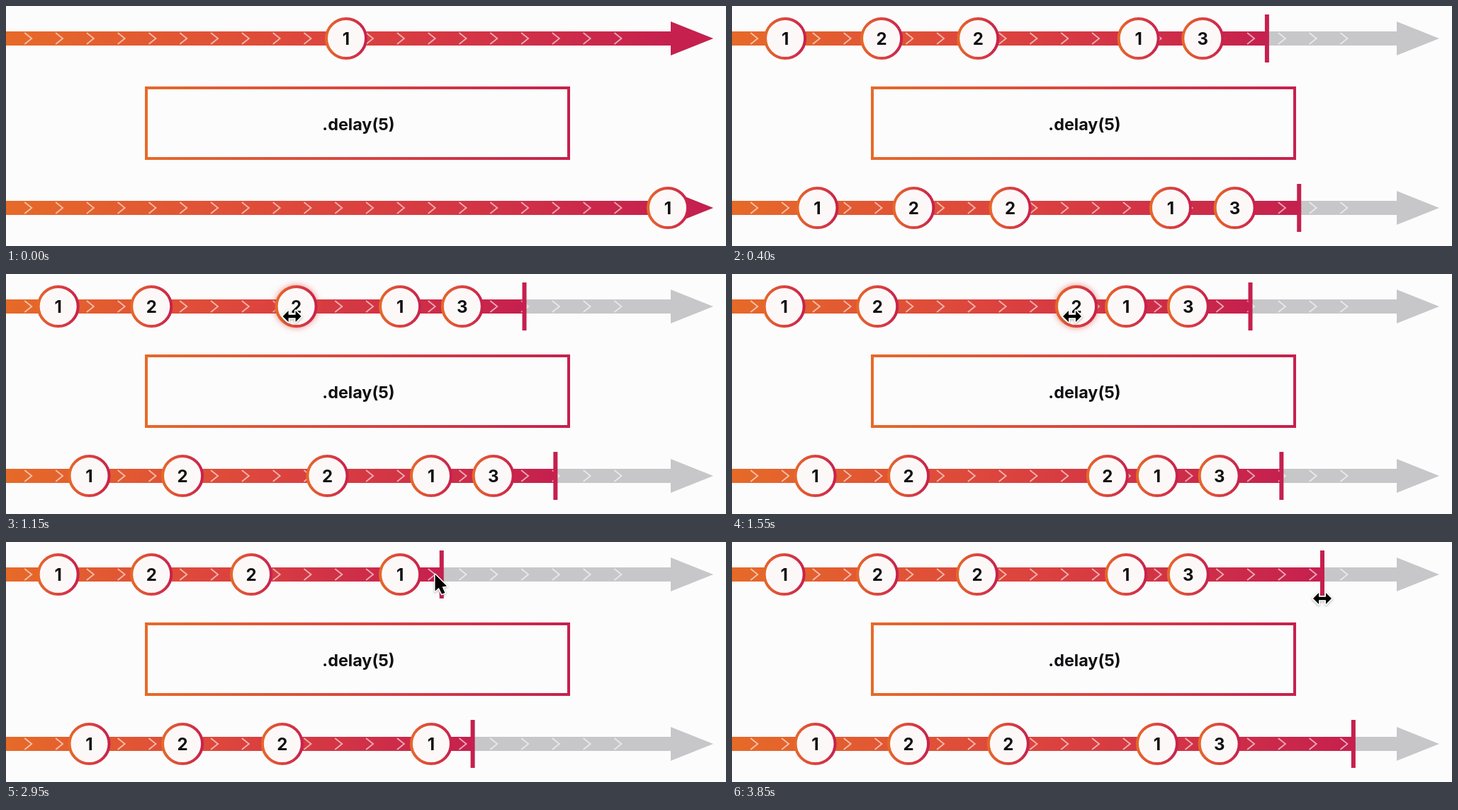
Write an HTML page with a canvas that moves like this. It is 1016x340 px and loops after 3900 ms.

```html
<!DOCTYPE html>
<html lang="en">
<head>
<meta charset="utf-8">
<title>Delay marble diagram</title>
<style>
html, body { margin: 0; width: 100%; height: 100%; overflow: hidden; background: #fcfcfd; }
canvas { display: block; }
</style>
</head>
<body>
<canvas id="stage" width="1016" height="340"></canvas>
<script>
const ctx = document.getElementById('stage').getContext('2d');
const LOOP = 3900, STEP = 50, DELAY = 5;
const PAPER = '#fcfcfd', INK = '#101012', RED = '#c5204e', IDLE = '#c7c7ca';
const ORIGIN = 29.8, WIDTH = 908, RANGE = 103.52;
const toTime = x => (x - ORIGIN) * RANGE / WIDTH;

// Progress from 0 to 1 between two times
const ramp = (t, from, to) => Math.min(1, Math.max(0, (t - from) / (to - from)));

const draggedX = t => 337 + 149 * ramp(t, 770, 1550) - 140 * ramp(t, 1550, 1820);
const endX = t => 731.5 - 126 * ramp(t, 2760, 2965) + 227.5 * ramp(t, 3050, 3550);
const isDragging = t => t >= 750 && t < 1850;

function gradient(from, to) {
  const g = ctx.createLinearGradient(from, 0, to, 0);
  g.addColorStop(0, '#e66a28');
  g.addColorStop(0.5, '#dc433e');
  g.addColorStop(1, RED);
  return g;
}

function label(text, x, y, size) {
  ctx.font = `700 ${size}px Inter, sans-serif`;
  ctx.textAlign = 'center';
  ctx.fillStyle = INK;
  ctx.fillText(text, x, y);
}

function polygon(points) {
  ctx.beginPath();
  points.forEach(([x, y]) => ctx.lineTo(x, y));
  ctx.closePath();
}

function arrowShape(y) {
  polygon([[0, y - 10], [938, y - 10], [938, y - 24], [998, y], [938, y + 24], [938, y + 10], [0, y + 10]]);
}

function track(y, end) {
  arrowShape(y);
  ctx.fillStyle = IDLE;
  ctx.fill();

  ctx.save();
  ctx.beginPath();
  ctx.rect(0, y - 30, end, 60);
  ctx.clip();
  arrowShape(y);
  ctx.fillStyle = gradient(0, Math.min(end, 938));
  ctx.fill();
  ctx.restore();

  ctx.beginPath();
  for (let i = 0; i < 20; i++) {
    const x = 36.3 + 43.8 * i;
    ctx.moveTo(x - 10, y - 8);
    ctx.lineTo(x, y);
    ctx.lineTo(x - 10, y + 8);
  }
  ctx.strokeStyle = 'rgba(255, 255, 255, 0.6)';
  ctx.lineWidth = 1.8;
  ctx.stroke();

  ctx.fillStyle = RED;
  ctx.fillRect(end - 3, y - 34, 6, 68);
}

function marble(x, y, text, glow) {
  ctx.beginPath();
  ctx.arc(x, y, 28, 0, 2 * Math.PI);
  ctx.save();
  if (glow) {
    ctx.shadowColor = '#e0503a';
    ctx.shadowBlur = 11;
  }
  ctx.fillStyle = '#fdf8f8';
  ctx.fill();
  ctx.restore();
  ctx.strokeStyle = gradient(x - 30, x + 30);
  ctx.lineWidth = 4;
  ctx.stroke();
  label(text, x, y + 9, 24);
}

function cursor(t) {
  if (t < 600) return;
  const enter = 1 - ramp(t, 600, 750);
  const cross = ramp(t, 1850, 2167);
  const held = draggedX(t) - 6, ahead = endX(t + 20);
  const x = held + 31 * enter + (ahead - held) * cross;
  const y = 60 - 63 * enter - 25 * cross + 11 * ramp(t, 2200, 2300) + 34 * ramp(t, 3000, 3600);
  const onHandle = isDragging(t) || Math.abs(x - endX(t)) < 4;

  ctx.save();
  ctx.translate(x, y);
  if (onHandle) {
    polygon([[-13, 0], [-5, -8], [-5, -2.2], [5, -2.2], [5, -8], [13, 0],
      [5, 8], [5, 2.2], [-5, 2.2], [-5, 8]]);
  } else {
    ctx.scale(0.87, 0.87);
    polygon([[0, 0], [0, 27], [6, 21.5], [11, 32], [16, 30], [11.5, 20], [19, 19]]);
  }
  ctx.lineWidth = 3.5;
  ctx.lineJoin = 'round';
  ctx.strokeStyle = '#fff';
  ctx.shadowColor = 'rgba(0, 0, 0, 0.3)';
  ctx.shadowBlur = 3;
  ctx.shadowOffsetY = 1;
  ctx.stroke();
  ctx.shadowColor = 'transparent';
  ctx.fillStyle = '#000';
  ctx.fill();
  ctx.restore();
}

function draw(t) {
  // Critically damped spring widens the visible time range.
  const k = 0.0143 * Math.max(0, t - 40);
  const rest = (1 + k) * Math.exp(-k);
  const scale = WIDTH / (RANGE - (RANGE - 10) * rest);
  const toX = time => ORIGIN - 3.8 * rest ** 3 + time * scale;
  const end = toTime(endX(t));
  const marbles = [[5, 1], [20, 2], [toTime(draggedX(t)), 2], [60, 1], [70, 3]];

  ctx.fillStyle = PAPER;
  ctx.fillRect(0, 0, 1016, 340);

  [[46, 0], [286, DELAY]].forEach(([y, delay]) => {
    track(y, toX(end + delay));
    marbles.forEach(([time, text], i) => {
      const glow = i === 2 && !delay && isDragging(t);
      if (time <= end) marble(toX(time + delay), y, text, glow);
    });
  });

  ctx.strokeStyle = gradient(196, 796);
  ctx.lineWidth = 4;
  ctx.strokeRect(198, 116, 596, 100);
  label('.delay(5)', 497.5, 175.5, 23.4);
  cursor(t);
}

const start = performance.now();
function tick() {
  const t = (performance.now() - start) % LOOP;
  draw(Math.floor(t / STEP) * STEP);
  requestAnimationFrame(tick);
}
tick();
</script>
</body>
</html>
```
